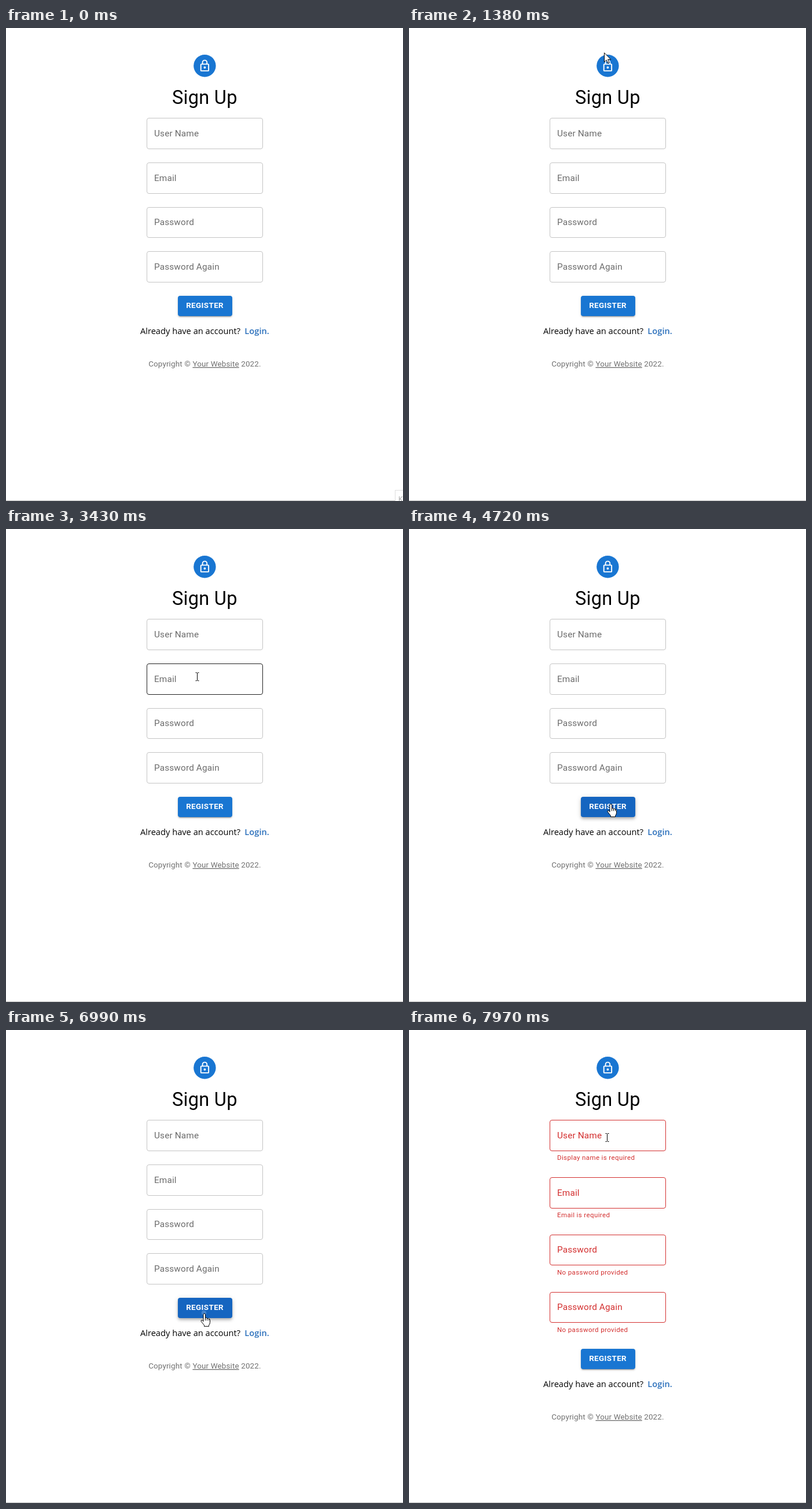
Write an HTML page that moves like this. It is 686 px wide and 816 px high and loops after 8 s.

```html
<!DOCTYPE html>
<html lang="en">
<head>
<meta charset="utf-8">
<title>Sign Up</title>
<style>
  html, body { margin: 0; width: 100%; height: 100%; overflow: hidden; background: #fff; }
  svg { position: absolute; left: 0; top: 0; font-family: Roboto, sans-serif; }
  #button {
    position: absolute; left: 296.5px; width: 94px; height: 34.6px;
    border-radius: 4px; overflow: hidden; background: #1976d2;
    box-shadow: 0 3px 1px -2px #0003, 0 2px 2px #00000024, 0 1px 5px #0000001f;
  }
  #button.hover {
    background: #1565c0;
    box-shadow: 0 2px 4px -1px #0003, 0 4px 5px #00000024, 0 1px 10px #0000001f;
  }
  #ripple {
    position: absolute; left: -11.2px; top: -31px; width: 114px; height: 114px;
    border-radius: 50%; background: #fff;
  }
  .title { font-size: 32.6px; letter-spacing: .00735em; }
  .label { font-size: 15.35px; letter-spacing: .00938em; }
  .error { font-size: 11.5px; letter-spacing: .03333em; fill: #d32f2f; }
  .caps { font-size: 13.43px; letter-spacing: .02857em; font-weight: 600; fill: #fff; }
  .small { font-size: 13.43px; letter-spacing: .01071em; fill: #717171; }
  .link { text-decoration: underline; text-decoration-thickness: 1px; }
  .prompt { font: 14.65px "Open Sans", sans-serif; }
  .login { font: 600 14.7px "Open Sans", sans-serif; fill: #2a6fbb; }
</style>
</head>
<body>
<div id="button"><div id="ripple"></div></div>
<svg width="686" height="816" viewBox="0 0 686 816">
  <circle cx="343.4" cy="65.2" r="19.2" fill="#1976d2"/>
  <g transform="translate(331.9 53.7) scale(.9594)" fill="none" stroke="#fff" stroke-width="2">
    <rect x="5" y="9" width="14" height="12" rx="1"/>
    <path d="M8 9V6a4 4 0 0 1 8 0v3"/>
    <circle cx="12" cy="15" r="2" fill="#fff" stroke="none"/>
  </g>
  <text class="title" x="343.4" y="131" text-anchor="middle">Sign Up</text>
  <g id="fields"></g>
  <g id="footer">
    <text class="caps" x="343.6" y="483" text-anchor="middle">REGISTER</text>
    <text class="prompt" x="232" y="528.3">Already have an account?</text>
    <text class="login" x="412.3" y="528.3">Login.</text>
    <text class="small" x="343.4" y="584" text-anchor="middle">Copyright © <tspan class="link">Your Website</tspan> 2022.</text>
  </g>
  <path d="M0 815.5H686" stroke="#bdbdbd"/>
  <g id="tip">
    <rect x="672.5" y="797.5" width="30" height="30" fill="#fff" stroke="#dedede"/>
    <text x="678" y="817" font-size="12" fill="#aaa">K</text>
  </g>
  <g id="cursor" stroke="#000">
    <path id="arrow" fill="#fff" d="M.5 .5V16.5L4.2 13 6.8 18.6 9.2 17.5 6.7 12H11.8Z"/>
    <path id="beam" fill="none" d="M-3-7h2l1 1 1-1h2M0-6V6M-3 7h2l1-1 1 1h2"/>
    <g id="hand">
      <path fill="#fff" d="M-1.5 13.5V1.5Q-1.5 0 .2 0T2 1.5V7.5Q4 6.5 5 8.3 7 7.5 8 9.2 10 8.7 10 11V15Q10 18 8 20V22H0V20Q-3 16.5-5.5 13-5.5 10.5-3 11.5Z"/>
      <path fill="none" d="M2 7.5V12M5 8.3V12M8 9.2V12"/>
    </g>
  </g>
</svg>
<script>
const LOOP = 8000, CLICK = 6960, FAIL = 7050, SHIFT = 88, MOVE = 420;
const $ = id => document.getElementById(id);
const clamp = v => Math.min(1, Math.max(0, v));

// Pointer stops: arrival time, x, y. Each move takes at most MOVE ms, then rests.
const stops = [
  [70, 690, 770],
  [600, 436.5, 200.5],  // passes the first field
  [820, 416, 58],
  [1380, 337, 42],      // avatar
  [1660, 322, 110],
  [2160, 326.5, 195.5], // user name
  [3100, 329.5, 250.5], // email
  [3430, 330.5, 254.5],
  [3710, 335.5, 336.5], // password
  [4120, 338.5, 405.5], // password again
  [4720, 348.5, 474.5], // button
  [5330, 417.5, 527.5], // login
  [5800, 383.5, 597.5],
  [6270, 381.5, 577.5], // website
  [6730, 342.5, 488.5], // button, click
  [7060, 342.5, 489.5],
  [7200, 346, 508],
  [7750, 399, 297],
  [7970, 342.5, 185.5]  // user name
];

function pointer(t) {
  if (t < stops[0][0]) return null;
  const i = stops.findIndex(s => s[0] > t);
  if (i < 0) return stops.at(-1).slice(1);
  const [t0, x0, y0] = stops[i - 1], [t1, x1, y1] = stops[i];
  const u = clamp(1 - (t1 - t) / Math.min(MOVE, t1 - t0));
  return [x0 + (x1 - x0) * u, y0 + (y1 - y0) * u];
}

function add(name, attrs, text = "") {
  const el = document.createElementNS("http://www.w3.org/2000/svg", name);
  for (const k in attrs) el.setAttribute(k, attrs[k]);
  el.textContent = text;
  return $("fields").appendChild(el);
}

const fields = [
  ["User Name", "Display name is required"],
  ["Email", "Email is required"],
  ["Password", "No password provided"],
  ["Password Again", "No password provided"]
].map(([label, error]) => ({
  box: add("rect", { x: 243.5, width: 200, rx: 3.5, fill: "none" }),
  label: add("text", { class: "label", x: 256 }, label),
  error: add("text", { class: "error", x: 256 }, error)
}));

const show = (id, on) => $(id).style.display = on ? "" : "none";

function draw(t) {
  const failed = t >= FAIL, dy = failed ? SHIFT : 0;
  const p = pointer(t);
  const over = (x, y, w, h) =>
    p && p[0] >= x && p[0] <= x + w && p[1] >= y && p[1] <= y + h;

  let typing = false;
  fields.forEach((f, i) => {
    const y = 155.2 + i * (failed ? 98.8 : 76.75), top = Math.round(y);
    const hover = over(243, y, 201, 54);
    typing = typing || hover;
    f.box.setAttribute("y", top + .5);
    f.box.setAttribute("height", Math.round(y + 52.6) - top);
    f.box.setAttribute("stroke", failed ? "#d32f2f" : hover ? "#212121" : "#c4c4c4");
    f.label.setAttribute("y", Math.round(y + 31.6));
    f.label.setAttribute("fill", failed ? "#d32f2f" : "#6c6c6c");
    f.error.setAttribute("y", y + 69.2);
    f.error.style.display = failed ? "" : "none";
  });

  const onButton = over(296, 462 + dy, 95, 35);
  const linked = onButton || over(412, 513 + dy, 43, 20) || over(322, 570 + dy, 81, 18);
  $("button").style.top = 462 + dy + "px";
  $("button").className = onButton ? "hover" : "";
  $("footer").setAttribute("transform", `translate(0 ${dy})`);

  const grow = 1 - (1 - clamp((t - CLICK) / 550)) ** 1.35;
  $("ripple").style.transform = `scale(${grow})`;
  $("ripple").style.opacity = t < CLICK ? 0 : .2 * clamp((7800 - t) / 600);

  show("tip", t < 70);
  show("cursor", p);
  if (!p) return;
  $("cursor").setAttribute("transform", `translate(${p})`);
  show("hand", linked);
  show("beam", typing && !linked);
  show("arrow", !typing && !linked);
}

const start = performance.now();
function tick() {
  draw((performance.now() - start) % LOOP);
  requestAnimationFrame(tick);
}
tick();
</script>
</body>
</html>
```
